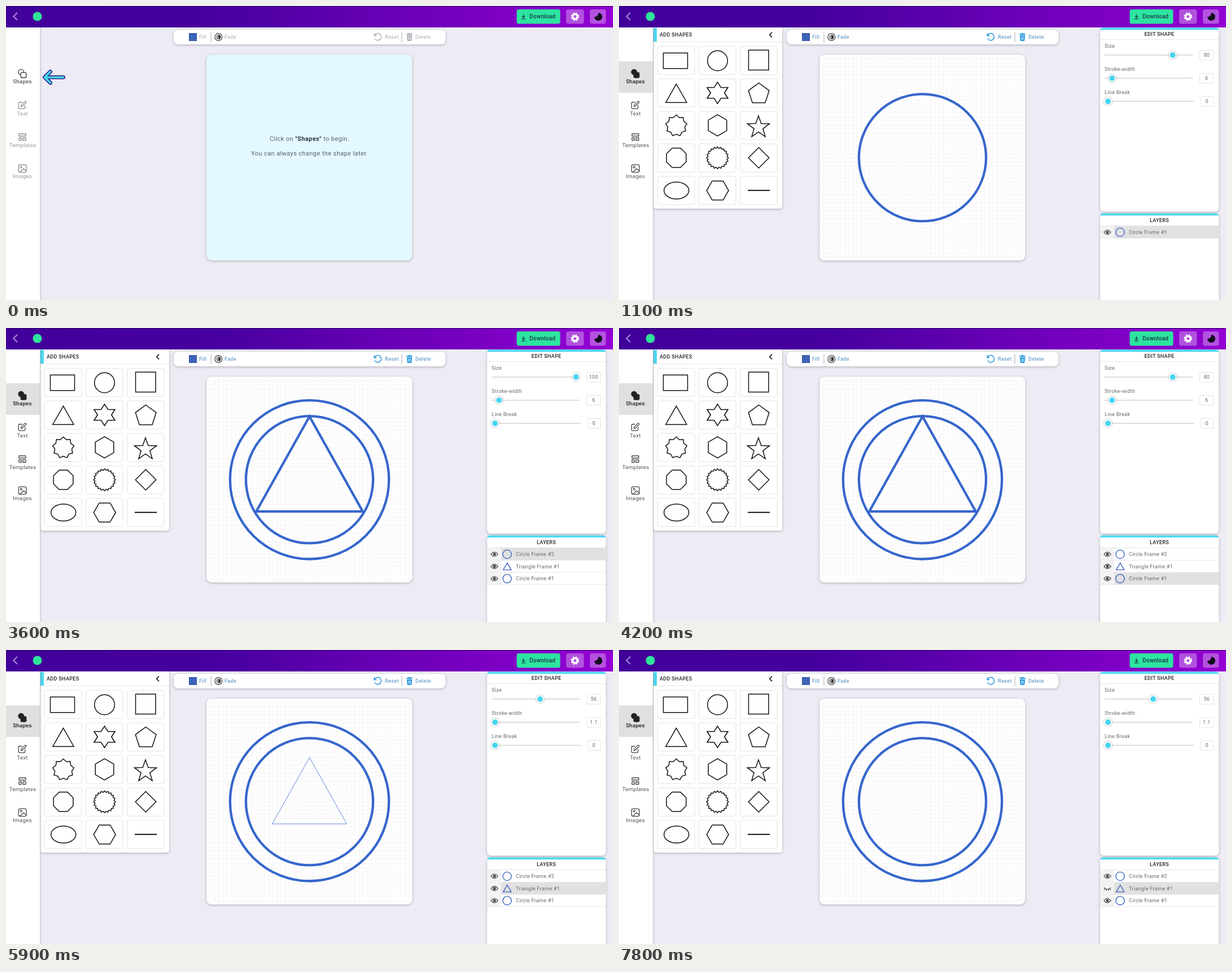
An HTML page for the animation above (8 s loop, 1075x521 px).

```html
<!DOCTYPE html>
<html lang="en">
<head>
<meta charset="utf-8">
<title>Shape editor</title>
<style>
  html, body { margin: 0; width: 100%; height: 100%; overflow: hidden; background: #edecf5; }
  svg { display: block; width: 100%; height: 100%; }
  text { font: 400 9px Roboto, Arial, sans-serif; letter-spacing: .33px; fill: #666; white-space: pre; }
  .mid { text-anchor: middle; }
  .title { font-weight: 500; fill: #222; }
  .hint { font-size: 11px; letter-spacing: .4px; fill: #55616c; }
  .hint tspan { font-weight: 700; fill: #2c3640; }
  .tool { font-weight: 500; fill: #b9bcc3; }
  .on .tool { fill: #6b9fcb; }
  .ico { stroke: #a9adb5; fill: none; }
  .on .ico { stroke: #2196dd; }
  .solid { fill: #a9adb5; }
  .on .solid { fill: #2196dd; }
  .nav text { font-size: 9.8px; letter-spacing: .2px; fill: #999; text-anchor: middle; }
  .nav g { fill: none; stroke: #888; stroke-width: 1.3; stroke-linejoin: round; stroke-linecap: round; }
  .on .nav text { fill: #555; }
  .on .nav g { stroke: #444; }
  .nav .first text { fill: #333; stroke: none; }
  .nav .first { stroke: #333; fill: #fff; }
  .open .nav .first { stroke: #222; fill: #222; }
  .open .nav .first text { font-weight: 500; fill: #222; }
  .card { fill: #fff; filter: drop-shadow(0 1px 2px rgba(0,0,0,.28)); }
  .cyan { fill: #4dd8f2; }
  .rule { stroke: #e6e6e6; fill: none; }
  .cell { fill: #fff; stroke: #e3e3e3; }
  .shape { fill: none; stroke: #111; stroke-width: 1.5; }
  .draw { fill: none; stroke: #3666cc; stroke-width: 4.3; }
  .knob { fill: #46d5f1; stroke: #fff; stroke-width: 2; filter: drop-shadow(0 0 1.5px rgba(0,0,0,.4)); }
  .eye { fill: none; stroke: #444; stroke-width: 1.1; stroke-linecap: round; }
</style>
</head>
<body>
<svg id="app" viewBox="0 0 1075 521" preserveAspectRatio="none">
  <defs>
    <linearGradient id="bar">
      <stop offset="0" stop-color="#42009a"/>
      <stop offset=".35" stop-color="#47009f"/>
      <stop offset="1" stop-color="#9400d3"/>
    </linearGradient>
    <pattern id="grid" x="355" y="86" width="7.3" height="7.3" patternUnits="userSpaceOnUse">
      <path d="M0 .5H7.3M.5 0V7.3" stroke="#f5f5f7" stroke-width="1"/>
    </pattern>
  </defs>
  <rect width="1075" height="521" fill="#edecf5"/>

  <g id="board">
    <rect class="card" id="paper" x="355" y="86" width="364.5" height="365" rx="9"/>
    <g id="hint">
      <text class="hint mid" x="537.5" y="239">Click on <tspan>"Shapes"</tspan> to begin.</text>
      <text class="hint mid" x="537.5" y="265">You can always change the shape later.</text>
    </g>
    <g id="art">
      <rect x="355" y="86" width="364.5" height="365" rx="9" fill="url(#grid)"/>
      <circle class="draw" id="c1" cx="537.5" cy="268.8" r="112.6"/>
      <path class="draw" id="tri"/>
      <circle class="draw" id="c2" cx="537.5" cy="268.8"/>
    </g>
  </g>

  <g id="tools">
    <rect class="card" x="297" y="42" width="481.5" height="26" rx="8"/>
    <rect x="324.5" y="48.5" width="13" height="13" fill="#3d64b8" stroke="#34549c"/>
    <text class="tool" x="342" y="58.3">Fill</text>
    <path d="M363 46.5V64M701 46.5V64" stroke="#aaa"/>
    <circle cx="376.3" cy="55" r="6.4" fill="#fff" stroke="#444" stroke-width="1.3"/>
    <path d="M376.3 50.8a4.2 4.2 0 0 0 0 8.4z" fill="#999"/>
    <path d="M376.3 50.8a4.2 4.2 0 0 1 0 8.4z" fill="#333"/>
    <text class="tool" x="387" y="58.3">Fade</text>
    <path class="ico" stroke-width="1.5" d="M652.3 48.5v4.2h4.2M652.6 52.3a6.2 6.2 0 1 1 .2 5.2"/>
    <text class="tool" x="671" y="58.3">Reset</text>
    <path class="solid" d="M709 49.3h3.4l.8-1.5h2.6l.8 1.5h3.4v1.7h-11zM709.9 52h9.2l-.6 8.6q-.1 1.4-1.5 1.4h-5q-1.4 0-1.5-1.4z"/>
    <path d="M712.6 54v6M714.5 54v6M716.4 54v6" stroke="#fff" stroke-width=".8"/>
    <text class="tool" x="725" y="58.3">Delete</text>
  </g>

  <g id="side">
    <rect class="card" x="852" y="39" width="210.5" height="325.5" rx="7"/>
    <path class="cyan" d="M852 42.2q1-3.7 6-3.7h198.5q5 0 6 3.7z"/>
    <text class="title mid" x="957" y="53.3">EDIT SHAPE</text>
    <path class="rule" d="M852 59.5h210.5M852 389.5h210.5"/>
    <g id="sliders"></g>
    <rect class="card" x="852" y="367.5" width="210.5" height="170" rx="7"/>
    <path class="cyan" d="M852 371.2q1-3.7 6-3.7h198.5q5 0 6 3.7z"/>
    <text class="title mid" x="957" y="382.6">LAYERS</text>
    <path class="rule" d="M852 389.5h210.5"/>
    <rect id="pick" x="877" width="185.5" height="21.5" fill="#e1e1e1"/>
    <g id="layers"></g>
  </g>

  <g id="panel">
    <rect class="card" x="61" y="36" width="228" height="323" rx="4"/>
    <rect class="cyan" x="61" y="39" width="6" height="24.5"/>
    <text class="title" x="72" y="54">ADD SHAPES</text>
    <path d="M271 46.5L266.8 51L271 55.5" fill="none" stroke="#111" stroke-width="1.7"/>
    <path class="rule" d="M61 63.5h228"/>
    <g id="cells"></g>
  </g>

  <rect class="card" x="-5" y="30" width="65" height="500"/>
  <rect id="active" x="0" y="98" width="60" height="56" fill="#e0e0e0"/>
  <g class="nav">
    <g class="first">
      <circle cx="26.7" cy="117" r="4.7"/>
      <rect x="26.2" y="117.8" width="9.6" height="9.2" rx="2"/>
      <text x="29" y="136.6">Shapes</text>
    </g>
    <g><path d="M28 170.5h-4q-1.7 0-1.7 1.7v8q0 1.7 1.7 1.7h8q1.7 0 1.7-1.7v-4M26.5 178l.6-2.9l6.2-6.2q1.1-.7 2 .2q.8 1 .1 1.9l-6.2 6.3z"/></g>
    <text x="29" y="194.3">Text</text>
    <g><path d="M23 226.5h12v4h-12zM23 233.5h4.2v4.5h-4.2zM30 233.5h5v4.5h-5z"/></g>
    <text x="29.6" y="249.8">Templates</text>
    <g><rect x="22.3" y="281.3" width="13.6" height="13.4" rx="2.6"/><circle cx="26.8" cy="285.6" r="1.5"/><path d="M24.5 294.5l6.6-6.3l4.6 4"/></g>
    <text x="29" y="305.4">Images</text>
  </g>

  <g id="arrow" fill="none" stroke-linecap="round" stroke-linejoin="round">
    <path d="M78.5 116.5L68.5 126.3L78.5 136M70 126.3H101.5" stroke="#3b2394" stroke-width="7"/>
    <path d="M78.5 116.5L68.5 126.3L78.5 136M70 126.3H101.5" stroke="#42d8e2" stroke-width="3.8"/>
  </g>

  <rect width="1075" height="38" fill="url(#bar)"/>
  <rect width="1075" height="1" fill="#240060"/>
  <path d="M20 11.7L13.3 18.4L20 25" fill="none" stroke="#a98bdf" stroke-width="2"/>
  <circle cx="55.5" cy="18.5" r="8" fill="#2fe39a"/>
  <rect x="904.5" y="6" width="77" height="25.5" rx="3.5" fill="#2de4a0"/>
  <path d="M916.5 14.8v5.2M914 18l2.5 2.6l2.5-2.6M912.8 22.8h7.4" fill="none" stroke="#173a4a" stroke-width="1.2"/>
  <text x="927" y="22.4" style="font-size:10px;font-weight:500;letter-spacing:.2px;fill:#1b3a4b">Download</text>
  <g fill="#fff" fill-opacity=".32">
    <rect x="992" y="6" width="31.5" height="25.5" rx="4"/>
    <rect x="1034" y="6" width="28.5" height="25.5" rx="4"/>
  </g>
  <g fill="none" stroke="#fff">
    <circle cx="1007.7" cy="18.8" r="4.2" stroke-width="3.4"/>
    <circle cx="1007.7" cy="18.8" r="6.3" stroke-width="2.2" stroke-dasharray="2.7 2.248"/>
  </g>
  <path d="M1049 12a7 7 0 1 1-7 7A6.4 6.4 0 0 0 1049 12z" fill="#120d1c"/>
</svg>
<script>
const $ = id => document.getElementById(id);
const CX = 537.5, CY = 268.8, LOOP = 8000, STEP = 100;

// Regular polygon, or a star when inner < 1.
function poly(x, y, n, r, inner = 1, turn = 0) {
  const count = inner < 1 ? n * 2 : n;
  let d = '';
  for (let i = 0; i < count; i++) {
    const a = (i / count) * Math.PI * 2 - Math.PI / 2 + turn;
    const k = inner < 1 && i % 2 ? r * inner : r;
    d += (i ? 'L' : 'M') + (x + k * Math.cos(a)).toFixed(2) + ' ' + (y + k * Math.sin(a)).toFixed(2);
  }
  return `<path class="shape" d="${d}Z"/>`;
}

const shapes = [
  '<rect class="shape" x="78.5" y="83.3" width="43" height="27.5"/>',
  '<circle class="shape" cx="174.5" cy="97" r="17.8"/>',
  '<rect class="shape" x="229.5" y="78.2" width="35.5" height="35.3"/>',
  '<path class="shape" d="M101.5 138.3L120 171H82.8Z"/>',
  `<g transform="translate(174.5 154) scale(1.12 1)">${poly(0, 0, 6, 19, .577)}</g>`,
  poly(247.6, 155.8, 5, 19.3),
  poly(101.5, 212, 9, 19, .8),
  poly(174.5, 211.5, 6, 18.8),
  poly(247, 215, 5, 20.5, .4),
  poly(101.5, 269, 8, 18.8, 1, Math.PI / 8),
  poly(174.5, 269, 20, 19.4, .87),
  poly(247.5, 269, 4, 18.3),
  '<ellipse class="shape" cx="101.7" cy="327" rx="22" ry="15"/>',
  poly(174.7, 327, 6, 19.4, 1, Math.PI / 6),
  '<path class="shape" style="stroke-width:2" d="M228 326.7h39"/>'
];
$('cells').innerHTML = shapes.map((s, i) =>
  `<rect class="cell" x="${68.5 + i % 3 * 73}" y="${71.5 + Math.floor(i / 3) * 57.6}" width="65.5" height="50" rx="2.5"/>` + s
).join('');

const sliders = [['Size', 87, 0], ['Stroke-width', 128, 0], ['Line Break', 169, 1]];
$('sliders').innerHTML = sliders.map(([name, y, dx]) =>
  `<text x="860" y="${y - 13.3}">${name}</text>
   <path d="M860 ${y}h${156 + dx * 2}" stroke="#dedede" stroke-width="2"/>
   <circle class="knob" cy="${y}" r="6"/>
   <rect class="cell" x="${1028.5 + dx * 1.5}" y="${y - 8.5}" width="${24.5 - dx * 1.5}" height="17.5" rx="2"/>
   <text class="mid val" x="${1040.8 + dx * .5}" y="${y + 3.3}"></text>`
).join('');
const knobs = [...document.querySelectorAll('.knob')];
const vals = [...document.querySelectorAll('.val')];

const ring = '<circle cx="887.5" cy="11" r="7.6" fill="none" stroke="#3d63c2" stroke-width="1.4"/>';
const tent = '<path d="M887.7 4.8L894.8 17H880.6Z" fill="none" stroke="#3d63c2" stroke-width="1.4"/>';
const row = (id, name, icon) =>
  `<g id="${id}"><rect x="852" width="25" height="21.5" fill="#f3f3f3"/>
   <path class="rule" d="M852 21.5h210.5"/>
   <g class="eye"><path d="M858.8 11q6-8 12.4 0q-6.4 7.6-12.4 0z"/><circle cx="865" cy="10.8" r="2" fill="#444"/></g>
   <path class="eye shut" d="M859 9.5q6 6 12 0M860.6 11.4l-1.6 2M863.4 12.6l-.6 2.3M866.8 12.6l.6 2.3M869.4 11.4l1.6 2" visibility="hidden"/>
   ${icon}<text x="903" y="14.3">${name}</text></g>`;
$('layers').innerHTML = row('rowC2', 'Circle Frame #2', ring) +
  row('rowT', 'Triangle Frame #1', tent) + row('rowC1', 'Circle Frame #1', ring);

// Each track: start time, then one value per step.
const tracks = {
  slide: [[0, -240], [200, -215, -165, -100, -45, -14, -3, 0]],
  size: [[0, 80], [3300, 84.4, 91.2, 97, 100], [4200, 80],
         [4800, 74.6, 68.8, 64.8, 61.6, 59.4, 58, 57, 56.4, 56]],
  stroke: [[0, 6], [5700, 4.2, 2.3, 1.1]],
  gap: [[0, 0], [6200, 4.8, 12.6, 20.4, 25.2], [6700, 14.4, 4.2, 0]],
  pick: [[0, 0], [4000, 2], [4300, 1]],
  hidden: [[0, 0], [7300, 1], [7600, 0], [7800, 1]]
};
function at(name, t) {
  const [start, ...v] = tracks[name].filter(k => k[0] <= t).pop();
  return v[Math.min(v.length - 1, Math.floor((t - start) / STEP))];
}
const show = (el, yes) => el.setAttribute('visibility', yes ? 'inherit' : 'hidden');
const set = (el, attrs) => { for (const k in attrs) el.setAttribute(k, attrs[k]); };

function render(t) {
  const size = at('size', t), stroke = at('stroke', t), gap = at('gap', t);
  const on = t >= 1100, open = t >= 100, hidden = at('hidden', t);
  $('app').setAttribute('class', (on ? 'on ' : '') + (open ? 'open' : ''));
  show($('active'), open);
  show($('arrow'), t < 200);
  show($('panel'), t >= 200);
  $('panel').setAttribute('transform', `translate(${at('slide', t)} 0)`);
  show($('hint'), !on);
  show($('art'), on);
  show($('side'), on);
  $('paper').style.fill = on ? '#fff' : '#e4f8ff';

  const triSize = t < 4300 ? 80 : size;
  const half = 1.178 * triSize, base = CY + .703 * triSize;
  set($('tri'), {
    d: `M${CX} ${CY - 1.4 * triSize}L${CX + half} ${base}H${CX - half}Z`,
    'stroke-dasharray': gap ? `${gap} ${gap}` : 'none'
  });
  $('tri').style.strokeWidth = stroke * .717;
  show($('tri'), t >= 2200 && !hidden);
  $('c2').setAttribute('r', 1.407 * (t < 4200 ? size : 100));
  show($('c2'), t >= 2700);

  [size, stroke, gap].forEach((v, i) => {
    knobs[i].setAttribute('cx', [865.2, 864.6, 866][i] + 1.443 * v);
    vals[i].textContent = +v.toFixed(1);
  });

  const rows = t < 2200 ? ['rowC1'] : t < 2700 ? ['rowT', 'rowC1'] : ['rowC2', 'rowT', 'rowC1'];
  ['rowC2', 'rowT', 'rowC1'].forEach(id => {
    const i = rows.indexOf(id);
    show($(id), i >= 0 && on);
    $(id).setAttribute('transform', `translate(0 ${390 + i * 21.6})`);
  });
  show($('rowT').querySelector('g.eye'), !hidden);
  show($('rowT').querySelector('.shut'), hidden);
  $('pick').setAttribute('y', 390 + at('pick', t) * 21.6);
}

function tick(now) {
  render(Math.floor((now % LOOP) / STEP) * STEP);
  requestAnimationFrame(tick);
}
render(0);
requestAnimationFrame(tick);
</script>
</body>
</html>
```
